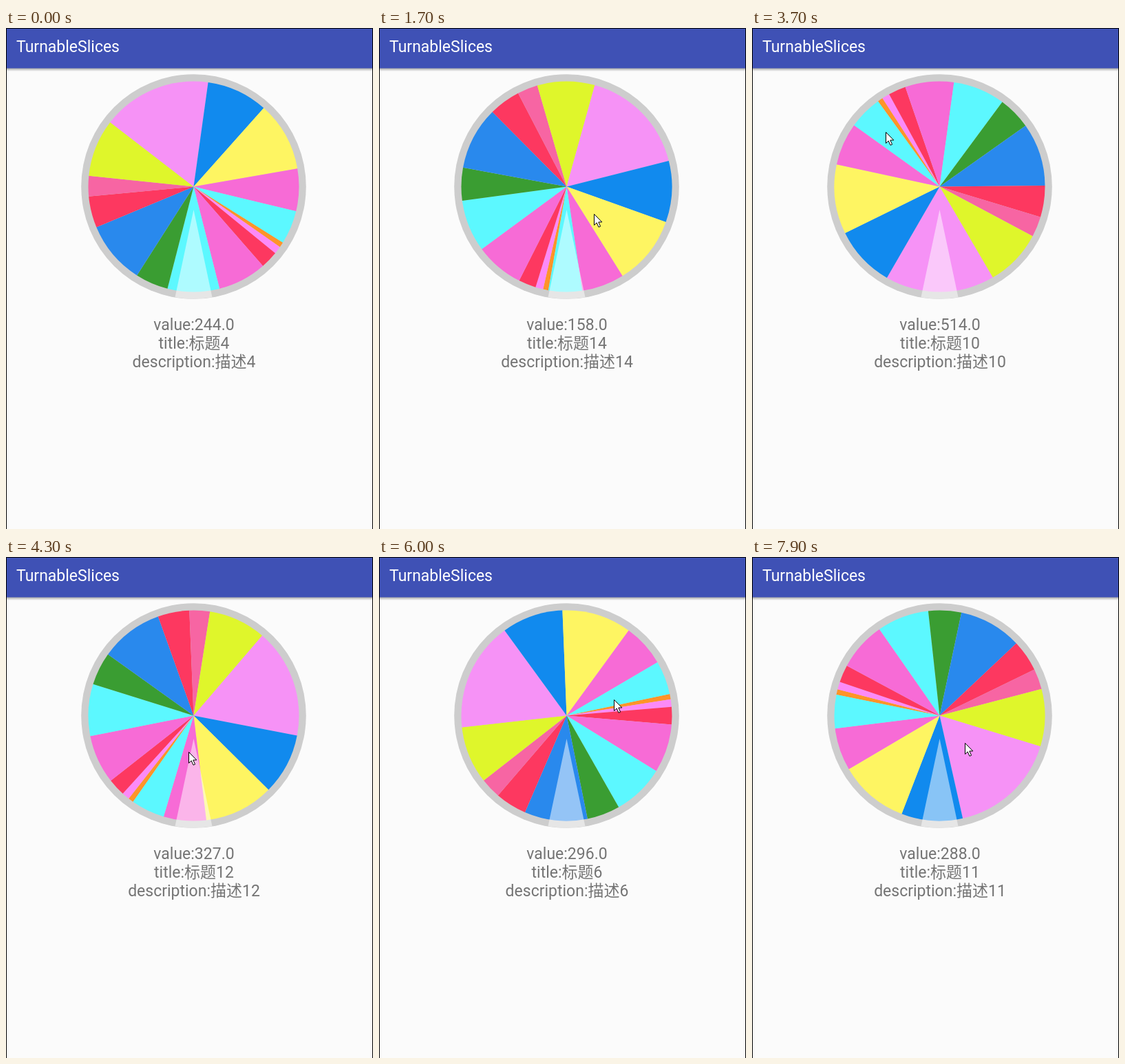
These frames come from a looping animation (533x728 px, 8 s). An HTML page:

```html
<!DOCTYPE html>
<html lang="zh">
<head>
<meta charset="utf-8">
<title>Pie wheel</title>
<style>
  html, body { margin: 0; width: 100%; height: 100%; overflow: hidden; background: #fbfbfb; }
  svg { display: block; width: 533px; height: 728px; }
  text { font-family: Roboto, "Noto Sans CJK SC", "Noto Sans CJK", sans-serif; font-size: 23px; }
  .info text { fill: #747474; text-anchor: middle; }
</style>
</head>
<body>
<svg viewBox="0 0 533 728">
  <defs>
    <linearGradient id="shade" x1="0" y1="0" x2="0" y2="1">
      <stop offset="0" stop-color="#000" stop-opacity=".36"/>
      <stop offset="1" stop-color="#000" stop-opacity="0"/>
    </linearGradient>
  </defs>
  <rect width="533" height="728" fill="#fbfbfb"/>
  <rect y="58" width="533" height="5" fill="url(#shade)"/>
  <rect width="533" height="58.5" fill="#3f51b5"/>
  <path d="M.5 728V.5H532.5V728" fill="none" stroke="#000"/>
  <text x="15" y="35" fill="#fff">TurnableSlices</text>

  <g transform="translate(272.5 230.5)">
    <circle r="163.3" fill="#cdcdcd"/>
    <g id="wheel"></g>
    <path d="M0 33.5L-27 160.8A163.3 163.3 0 0 0 27 160.8Z" fill="#fff" fill-opacity=".5"/>
  </g>

  <g class="info">
    <text id="value" x="273" y="439"></text>
    <text id="title" x="273" y="466"></text>
    <text id="desc" x="273" y="493"></text>
  </g>
  <path id="cursor" d="M.5 .5V16.5L4.2 13L7 19.3L9.6 18.2L6.8 12H11.8Z" fill="#fff" stroke="#000"/>
</svg>
<script>
const LOOP = 8000, STEP = 100, LABEL_LAG = 30, RADIUS = 153;
const values = [25, 36, 82, 229, 244, 155, 296, 148, 96, 270, 514, 288, 327, 200, 158];
const colors = ['#ff9429', '#fc8af8', '#fd3860', '#f76bd6', '#5cf8ff', '#3a9d32', '#2989ed', '#fd3860',
  '#f765a3', '#dff62b', '#f692f6', '#118aee', '#fef562', '#f76bd6', '#5cf8ff'];

const linear = u => u;
const speedUp = u => u * u;
const slowDown = p => u => 1 - (1 - u) ** p;
const smooth = u => (1 - Math.cos(Math.PI * u)) / 2;

// Each key: time, [values], easing towards this key
const spin = [
  [1000, [122.1]],
  [1700, [190], speedUp],        // drag
  [2400, [303], slowDown(2)],    // fling
  [2700, [303]],
  [3400, [324.2], smooth],       // settle on the slice centre
  [3700, [324.2]],
  [4300, [215.1], speedUp],
  [5100, [87], slowDown(2)],
  [5200, [87]],
  [5500, [84]],
  [5700, [84]],
  [6300, [78.1 * 2 - 84], smooth],
  [6400, [72.2]],
  [7200, [186.5], speedUp],
  [7900, [281.5], slowDown(3.4)]
];
const pointer = [
  [200, [481, 75]],
  [900, [372, 216], smooth],
  [1100, [372, 216]],
  [1450, [352, 250], speedUp],
  [1700, [312, 270]],
  [1800, [298, 276]],
  [2700, [298, 276]],
  [3400, [194, 151], smooth],
  [3700, [194, 151]],
  [4050, [196, 218], speedUp],
  [4300, [265, 283]],
  [4400, [284, 286]],
  [5200, [284, 286]],
  [5500, [341, 207], smooth],
  [6000, [341, 207]],
  [6400, [336, 166], smooth],
  [6900, [352, 236], speedUp],
  [7200, [307, 293]],
  [7500, [309, 270], smooth]
];

function track(keys, t) {
  const i = keys.findIndex(k => k[0] > t);
  if (i === 0) return keys[0][1];
  if (i < 0) return keys[keys.length - 1][1];
  const [t0, from] = keys[i - 1], [t1, to, ease = linear] = keys[i];
  const u = ease((t - t0) / (t1 - t0));
  return from.map((v, n) => v + (to[n] - v) * u);
}

const $ = id => document.getElementById(id);
const total = values.reduce((a, b) => a + b);
const ends = [];
const rim = deg => {
  const a = deg * Math.PI / 180;
  return `${(RADIUS * Math.sin(a)).toFixed(2)} ${(-RADIUS * Math.cos(a)).toFixed(2)}`;
};

let angle = 0;
values.forEach((v, i) => {
  const end = angle + v / total * 360;
  const slice = document.createElementNS('http://www.w3.org/2000/svg', 'path');
  slice.setAttribute('d', `M0 0L${rim(angle)}A${RADIUS} ${RADIUS} 0 0 1 ${rim(end)}Z`);
  slice.setAttribute('fill', colors[i]);
  $('wheel').append(slice);
  ends.push(angle = end);
});

// The slice lying under the bottom marker
function picked(turn) {
  const at = ((180 - turn) % 360 + 360) % 360;
  return Math.max(0, ends.findIndex(end => at < end));
}

function draw(t) {
  const item = picked(track(spin, t - LABEL_LAG)[0]);
  $('wheel').setAttribute('transform', `rotate(${track(spin, t)[0]})`);
  $('value').textContent = `value:${values[item].toFixed(1)}`;
  $('title').textContent = `title:标题${item}`;
  $('desc').textContent = `description:描述${item}`;
  $('cursor').setAttribute('transform', `translate(${track(pointer, t).map(Math.round).join(' ')})`);
  $('cursor').style.display = t < 200 ? 'none' : '';
}

// The screen refreshes ten times a second
const start = performance.now();
function tick() {
  const t = (performance.now() - start + 8) % LOOP;
  draw(Math.floor(t / STEP) * STEP);
  requestAnimationFrame(tick);
}
tick();
</script>
</body>
</html>
```
